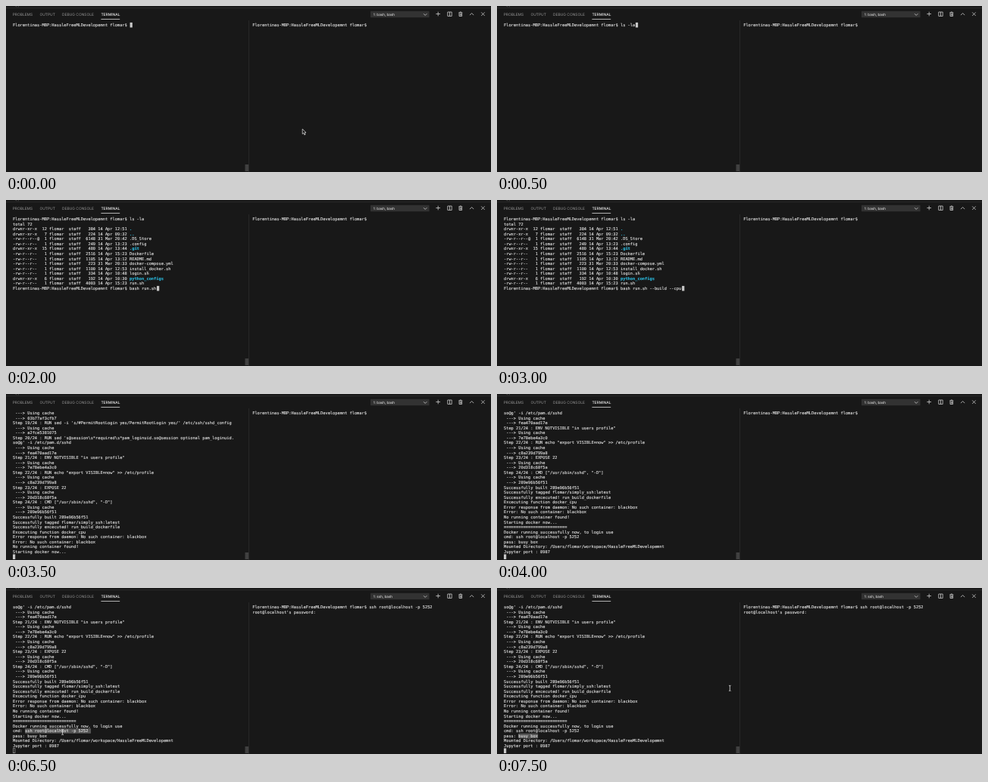
These frames come from a looping animation (640x220 px, 8 s). An HTML page:

```html
<!DOCTYPE html>
<html lang="en">
<head>
<meta charset="utf-8">
<title>Terminal session</title>
<style>
  html, body { margin: 0; width: 100%; height: 100%; overflow: hidden; background: #181818; }
  svg { display: block; width: 640px; height: 220px; }
  text { white-space: pre; text-rendering: geometricPrecision; }
  .mono text { font: 5.348px "DejaVu Sans Mono", monospace; fill: #e0e0e0; stroke: #e0e0e0; stroke-width: .12; }
  .mono .dir { fill: #2bb8dc; stroke: #2bb8dc; font-weight: bold; }
  .ui { font: 4.9px Inter, sans-serif; fill: #979797; }
  .ui .active { fill: #f2f2f2; font-weight: 500; }
  .icon { fill: none; stroke: #cccccc; stroke-width: .8; }
</style>
</head>
<body>
<svg viewBox="0 0 640 220">
  <rect width="640" height="220" fill="#181818"/>
  <text class="ui" x="12" y="1.6" style="fill:#666">&lt;?</text>
  <rect y="2.4" width="640" height=".7" fill="#303030"/>

  <g class="ui">
    <text x="8.7" y="13">PROBLEMS</text>
    <text x="44.4" y="13">OUTPUT</text>
    <text x="74" y="13">DEBUG CONSOLE</text>
    <text x="125.4" y="13" class="active">TERMINAL</text>
  </g>
  <rect x="125.4" y="17" width="24.8" height=".8" fill="#d8d8d8"/>

  <rect x="481" y="6.8" width="77.5" height="8.4" fill="#323232"/>
  <text id="shell" class="ui" x="484.8" y="12.8" style="font-size:4.6px;fill:#f4f4f4"></text>
  <g class="icon">
    <path d="M551 10.2l2.2 2.2 2.2-2.2"/>
    <path d="M567.4 10.5h5.6M570.2 7.7v5.6"/>
    <path d="M582.8 8h5.4v5.4h-5.4zM585.5 8v5.4"/>
    <path d="M597.3 8.8h5M598.9 8.8V8h1.8v.8M598 9.2v4.3h3.6V9.2M599.2 10v2.6M600.4 10v2.6"/>
    <path d="M612 12.1l2.6-2.6 2.6 2.6"/>
    <path d="M627.2 8.4l4.5 4.5M631.7 8.4l-4.5 4.5"/>
  </g>

  <rect x="320" y="19" width=".8" height="201" fill="#2e2e2e"/>
  <rect x="315.5" y="210" width="4.5" height="9" fill="#404040"/>

  <rect id="mark" height="6.57" fill="#555"/>
  <rect id="caret"/>
  <g id="left" class="mono"></g>
  <g id="right" class="mono"></g>

  <path id="arrow" d="M0 0v6.6l1.5-1.4 1.1 2.6 1.2-.5-1.1-2.5h2.1z" fill="#111" stroke="#eee" stroke-width=".7"/>
  <path id="beam" d="M-1.3-3.6Q0-3.6 0-2.8Q0-3.6 1.3-3.6M0-2.8V2.8M-1.3 3.6Q0 3.6 0 2.8Q0 3.6 1.3 3.6" fill="none" stroke="#e6e6e6" stroke-width=".8"/>
</svg>

<script>
const STEP = 500, COUNT = 16;
const CHAR = 3.22, ROW = 6.57, TOP = 21.9, LEFT = 9, RIGHT = 325.2;
const USER = 'flomar';
const PROMPT = `Florentinas-MBP:HassleFreeMLDevelopemnt ${USER}$ `;
const SSH = 'ssh root@localhost -p 5252';
const BUILD = 'bash run.sh --build --cpu';
const $ = id => document.getElementById(id);

// mode, links, size, date, name
const files = `
drwxr-xr-x|12|384|14 Apr 12:51|.
drwxr-xr-x|7|224|14 Apr 09:32|..
-rw-r--r--@|1|6148|31 Mar 20:42|.DS_Store
-rw-r--r--|1|249|14 Apr 13:23|.config
drwxr-xr-x|15|480|14 Apr 13:44|.git
-rw-r--r--|1|2516|14 Apr 15:23|Dockerfile
-rw-r--r--|1|1105|14 Apr 13:12|README.md
-rw-r--r--|1|223|31 Mar 20:33|docker-compose.yml
-rw-r--r--|1|1100|14 Apr 12:53|install_docker.sh
-rw-r--r--|1|334|14 Apr 10:48|login.sh
drwxr-xr-x|6|192|14 Apr 10:30|python_configs
-rw-r--r--|1|4003|14 Apr 15:23|run.sh`.trim().split('\n').map(line => {
  const [mode, links, size, date, name] = line.split('|');
  const info = `${mode.padEnd(11)}${links.padStart(3)} ${USER}  staff  ${size.padStart(4)} ${date} `;
  return mode[0] === 'd' ? [info, name] : info + name;
});

const cached = id => [' ---> Using cache', ` ---> ${id}`];
const log = [
  ...cached('03b77af3cfb7'),
  "Step 19/24 : RUN sed -i 's/#PermitRootLogin yes/PermitRootLogin yes/' /etc/ssh/sshd_config",
  ...cached('a2fce5381075'),
  "Step 20/24 : RUN sed 's@session\\s*required\\s*pam_loginuid.so@session optional pam_loginuid.",
  "so@g' -i /etc/pam.d/sshd",
  ...cached('fea470aad17e'),
  'Step 21/24 : ENV NOTVISIBLE "in users profile"',
  ...cached('7e78ebe4a3c0'),
  'Step 22/24 : RUN echo "export VISIBLE=now" >> /etc/profile',
  ...cached('c8a239d799a8'),
  'Step 23/24 : EXPOSE 22',
  ...cached('20d318c68f5a'),
  'Step 24/24 : CMD ["/usr/sbin/sshd", "-D"]',
  ...cached('289e96b56f51'),
  'Successfully built 289e96b56f51',
  `Successfully tagged ${USER}/simply_ssh:latest`,
  'Successfully excecuted! run_build_dockerfile',
  'Excecuting function docker_cpu',
  'Error response from daemon: No such container: blackbox',
  'Error: No such container: blackbox',
  'No running container found!',
  'Starting docker now...',
  '='.repeat(26),
  'Docker running successfully now, to login use',
  'cmd: ' + SSH,
  'pass: busy_box',
  `Mounted Directory: /Users/${USER}/workspace/HassleFreeMLDevelopemnt`,
  'Jupyter port : 8987'
];

const listing = typed => [PROMPT + 'ls -la', 'total 72', ...files, PROMPT + typed];

function leftRows(i) {
  if (i < 2) return [PROMPT + (i ? 'ls -la' : '')];
  if (i < 7) return listing(BUILD.slice(0, [0, 4, 11, 19, 25][i - 2]));
  return i < 8 ? [...log.slice(0, 29), ''] : [...log.slice(6), ''];
}

function rightRows(i) {
  if (i < 11) return [PROMPT];
  return [PROMPT + SSH, ...(i > 11 ? ["root@localhost's password:"] : [])];
}

// row, first column, length
const marks = i => i < 9 ? null : i < 14 ? [25, 5, 27] : [26, 6, 8];

const pointers = {
  0: ['arrow', 391.2, 163],
  10: ['arrow', 398.6, 115.8],
  13: ['beam', 74.6, 191],
  14: ['beam', 42, 197],
  15: ['beam', 307.3, 132.8]
};

function setAttrs(el, attrs) {
  for (const key in attrs) el.setAttribute(key, attrs[key]);
}

function node(tag, attrs, text) {
  const el = document.createElementNS('http://www.w3.org/2000/svg', tag);
  setAttrs(el, attrs);
  el.textContent = text;
  return el;
}

function drawRows(pane, x, rows) {
  pane.replaceChildren(...rows.map((row, r) => {
    const [plain, dir] = [].concat(row);
    const line = node('text', { x, y: TOP + r * ROW + 5.1 }, plain);
    if (dir) line.append(node('tspan', { class: 'dir' }, dir));
    return line;
  }));
}

function draw(i) {
  const rows = leftRows(i), last = rows.length - 1;
  drawRows($('left'), LEFT, rows);
  drawRows($('right'), RIGHT, rightRows(i));
  $('shell').textContent = i < 13 ? '1: bash, bash' : '1: ssh, bash';

  const hollow = i >= 10 && i < 14, inset = hollow ? .3 : 0;
  setAttrs($('caret'), {
    x: LEFT + rows[last].length * CHAR + inset,
    y: TOP + last * ROW + inset,
    width: CHAR - 2 * inset,
    height: ROW - 2 * inset,
    fill: hollow ? 'none' : '#c8c8c8',
    stroke: hollow ? '#b0b0b0' : 'none',
    'stroke-width': .6
  });

  const [row, col, len] = marks(i) || [0, 0, 0];
  setAttrs($('mark'), { x: LEFT + col * CHAR, y: TOP + row * ROW, width: len * CHAR });

  const [kind, x, y] = pointers[i] || [];
  for (const id of ['arrow', 'beam']) {
    $(id).style.display = id === kind ? '' : 'none';
    if (id === kind) $(id).setAttribute('transform', `translate(${x} ${y})`);
  }
}

let shown = -1;
const start = performance.now();
function tick() {
  const i = Math.floor((performance.now() - start) / STEP) % COUNT;
  if (i !== shown) draw(shown = i);
  requestAnimationFrame(tick);
}
tick();
</script>
</body>
</html>
```
